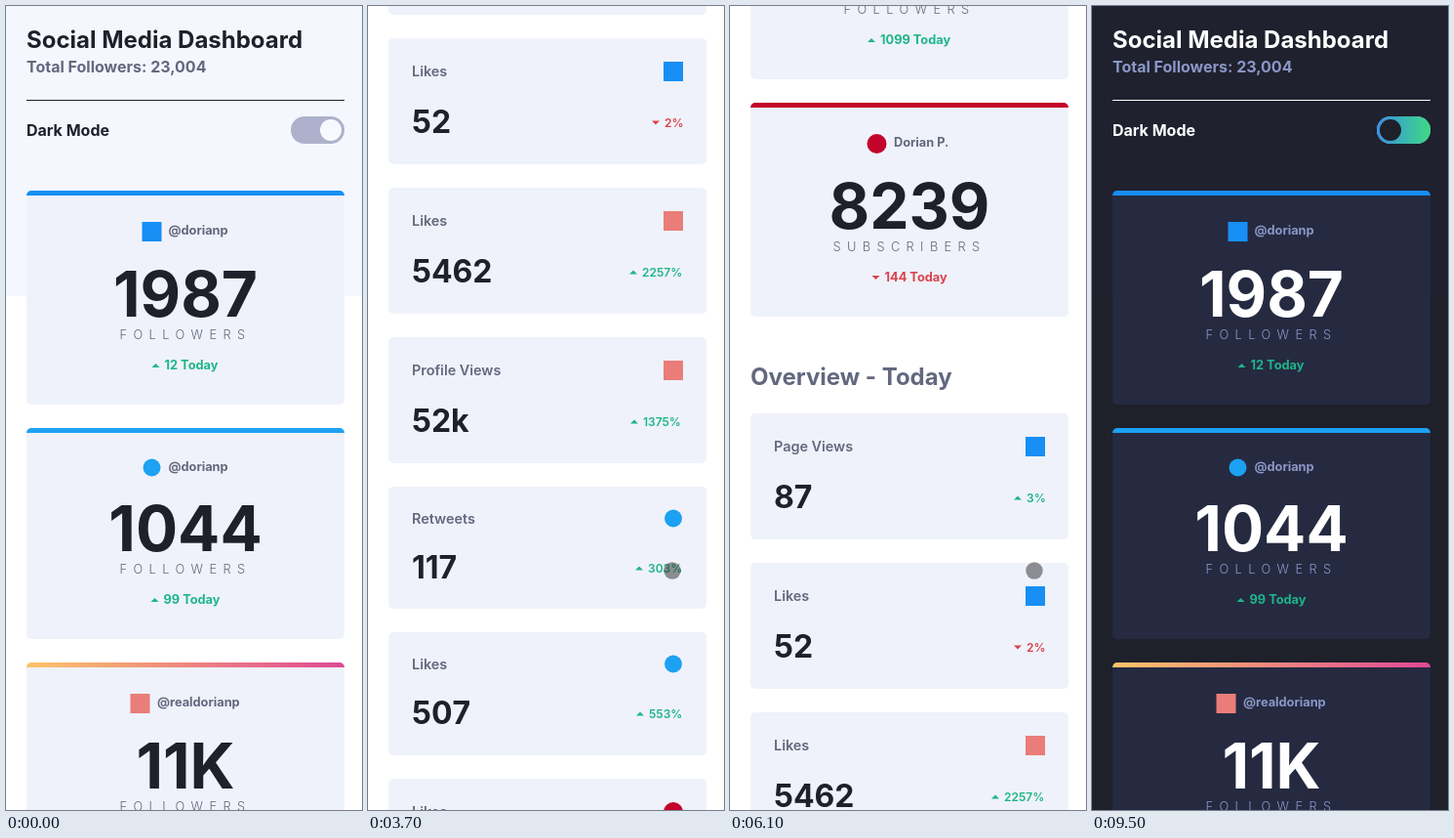
An HTML page that plays this animation: 365 px wide and 823 px high, repeating every 9.9 s.

```html
<!DOCTYPE html>
<html lang="en">
<head>
<meta charset="utf-8">
<title>Social Media Dashboard</title>
<style>
  html, body { margin: 0; width: 100%; height: 100%; overflow: hidden; background: var(--bg); }
  svg { display: block; font-family: Inter, sans-serif; font-weight: 700; }
  text { white-space: pre; }
  .bg { fill: var(--bg); }
  .header { fill: var(--header); }
  .card { fill: var(--card); }
  .strong { fill: var(--strong); }
  .muted { fill: var(--muted); }
  .knob { fill: var(--knob); }
  .title { font-size: 24px; }
  .body { font-size: 16px; }
  .small { font-size: 12.8px; }
  .label { font-size: 14.4px; font-weight: 600; }
  .value { font-size: 32px; font-kerning: none; }
  .count { font-size: 64px; font-kerning: none; text-anchor: middle; }
  .unit { font-size: 12.8px; font-weight: 300; letter-spacing: 6.4px; text-anchor: middle; }
  .percent { font-size: 12px; font-weight: 600; }
</style>
</head>
<body>
<svg width="365" height="823" viewBox="0 0 365 823">
  <defs>
    <linearGradient id="sunset" gradientUnits="userSpaceOnUse" x1="21" x2="347" y1="0" y2="0">
      <stop stop-color="#fdc468"/><stop offset="1" stop-color="#df4996"/>
    </linearGradient>
    <linearGradient id="on">
      <stop stop-color="#378fe6"/><stop offset="1" stop-color="#3eda82"/>
    </linearGradient>
  </defs>
  <rect class="bg" width="365" height="823"/>
  <g id="page">
    <rect class="header" width="365" height="297"/>
    <text class="title strong" x="21" y="43">Social Media Dashboard</text>
    <text class="body muted" x="21" y="68">Total Followers: 23,004</text>
    <rect class="strong" x="21" y="96" width="326" height="1"/>
    <text class="body strong" x="21" y="133">Dark Mode</text>
    <rect x="292" y="113" width="55" height="28" rx="14" fill="#aeb1cb"/>
    <rect id="switchOn" x="292" y="113" width="55" height="28" rx="14" fill="url(#on)"/>
    <circle id="knob" class="knob" cy="127" r="11"/>
    <text class="title muted" x="21" y="1204">Overview - Today</text>
    <g id="cards"></g>
  </g>
  <circle id="cursor" r="8.7" fill="#282828" fill-opacity=".5"/>
</svg>
<script>
const LOOP = 9900, STEP = 100;
const $ = id => document.getElementById(id);

const networks = {
  fb: { color: '#178ff5', bar: '#178ff5' },
  tw: { color: '#1da1f2', bar: '#1da1f2', round: true, short: true },
  ig: { color: '#ea7d79', bar: 'url(#sunset)' },
  yt: { color: '#c4032b', bar: '#c4032b', round: true },
};

// network, top, height, icon x, handle x, handle, count, unit, trend x, trend
const profiles = [
  ['fb', 189, 219, 149.5, 166.5, '@dorianp', '1987', 'FOLLOWERS', 149.5, '+12 Today'],
  ['tw', 432, 216, 149.5, 166.5, '@dorianp', '1044', 'FOLLOWERS', 148.5, '+99 Today'],
  ['ig', 672, 219, 137.5, 155, '@realdorianp', '11K', 'FOLLOWERS', 141, '+1099 Today'],
  ['yt', 915, 219, 150.5, 168, 'Dorian P.', '8239', 'SUBSCRIBERS', 145.5, '-144 Today'],
];

// network, top, height, label, value, trend x, trend
const stats = [
  ['fb', 1233, 129, 'Page Views', '87', 291, '+3%'],
  ['fb', 1386, 129, 'Likes', '52', 291, '-2%'],
  ['ig', 1539, 129, 'Likes', '5462', 268, '+2257%'],
  ['ig', 1692, 129, 'Profile Views', '52k', 269, '+1375%'],
  ['tw', 1845, 125, 'Retweets', '117', 274, '+303%'],
  ['tw', 1994, 126, 'Likes', '507', 275, '+553%'],
  ['yt', 2144, 129, 'Likes', '107', 284, '-19%'],
];

const text = (cls, x, y, s) => `<text class="${cls}" x="${x}" y="${y}">${s}</text>`;

const panel = (y, h) => `<rect class="card" x="21" y="${y}" width="326" height="${h}" rx="5"/>`;

function icon({ color, round, short }, x, y) {
  return round
    ? `<circle cx="${x}" cy="${y}" r="${short ? 9 : 10}" fill="${color}"/>`
    : `<rect x="${x - 10}" y="${y - 10}" width="20" height="20" fill="${color}"/>`;
}

function trend(cls, x, y, s) {
  const up = s[0] === '+';
  const arrow = up ? `M${x} ${y - 2}l4-4 4 4z` : `M${x} ${y - 6}l4 4 4-4z`;
  return `<g fill="${up ? '#1eb589' : '#dc414c'}"><path d="${arrow}"/>${
    text(cls, x + 13, y, s.slice(1))}</g>`;
}

function profileCard([key, y, h, iconX, handleX, handle, count, unit, trendX, change]) {
  const net = networks[key], lift = net.short ? 3 : 0;
  return panel(y, h) +
    `<path d="M21 ${y + 5}a5 5 0 0 1 5-5h316a5 5 0 0 1 5 5z" fill="${net.bar}"/>` +
    icon(net, iconX, y + 42 - lift / 2) +
    text('small muted', handleX, y + 45 - lift / 2, handle) +
    text('count strong', 184, y + 128.5 - lift, count) +
    text('unit muted', 184, y + 152 - lift, unit) +
    trend('small', trendX, y + 183 - lift, change);
}

function statCard([key, y, h, label, value, trendX, change]) {
  const net = networks[key], lift = net.short ? 3 : 0;
  return panel(y, h) +
    icon(net, 313, y + 34 - lift / 2) +
    text('label muted', 45, y + 39 - lift / 2, label) +
    text('value strong', 45, y + 97 - lift, value) +
    trend('percent', trendX, y + 90.5 - lift, change);
}

$('cards').innerHTML = profiles.map(profileCard).join('') + stats.map(statCard).join('');

// start, end, scroll position reached; each flick decelerates
const flicks = [
  [700, 900, 40], [1000, 2000, 474], [2000, 2500, 640], [2600, 2900, 700],
  [3000, 4000, 1418], [4000, 4300, 1430], [4900, 5900, 1162],
  [5900, 6400, 622], [6600, 7300, 0],
];

// time, x, y
const cursorPath = [
  [200, 180, 662], [400, 194, 581], [2000, 194, 581], [2300, 274, 580],
  [2600, 274, 580], [2900, 312, 578], [7500, 312, 578], [8200, 340, 130],
  [8600, 340, 130], [9300, 225, 761], [9400, 207, 818],
];

const palette = {
  bg: ['#ffffff', '#1e202a'],
  header: ['#f5f7ff', '#1f212e'],
  card: ['#eff2fa', '#252a41'],
  strong: ['#1e202a', '#ffffff'],
  muted: ['#63687e', '#8b97c6'],
  knob: ['#f8f9ff', '#1e202a'],
};

const lerp = (a, b, p) => a + (b - a) * p;
const progress = (t, a, b) => Math.min(1, Math.max(0, (t - a) / (b - a)));
const smooth = p => p * p * (3 - 2 * p);
const channels = hex => [1, 3, 5].map(i => parseInt(hex.slice(i, i + 2), 16));

function mix(a, b, p) {
  const end = channels(b);
  return `rgb(${channels(a).map((v, i) => Math.round(lerp(v, end[i], p)))})`;
}

function scrollAt(t) {
  let y = 0;
  for (const [start, end, to] of flicks)
    y = lerp(y, to, 1 - (1 - progress(t, start, end)) ** 2);
  return Math.round(y);
}

function cursorAt(t) {
  let [, x, y] = cursorPath[0];
  for (let i = 1; i < cursorPath.length; i++) {
    const p = smooth(progress(t, cursorPath[i - 1][0], cursorPath[i][0]));
    x = lerp(x, cursorPath[i][1], p);
    y = lerp(y, cursorPath[i][2], p);
  }
  return [x, y];
}

function draw(t) {
  const dark = smooth(progress(t, 8300, 8800));
  for (const name in palette)
    document.documentElement.style.setProperty('--' + name, mix(...palette[name], dark));
  $('switchOn').setAttribute('opacity', dark);
  $('knob').setAttribute('cx', lerp(333, 306, dark));
  $('page').setAttribute('transform', `translate(0 ${-scrollAt(t)})`);
  $('cursor').setAttribute('transform', `translate(${cursorAt(t)})`);
  $('cursor').setAttribute('visibility', t >= 200 && t < 9500 ? 'visible' : 'hidden');
}

const origin = performance.now();
function tick() {
  const t = (performance.now() - origin) % LOOP;
  draw(Math.floor(t / STEP) * STEP);
  requestAnimationFrame(tick);
}
tick();
</script>
</body>
</html>
```
